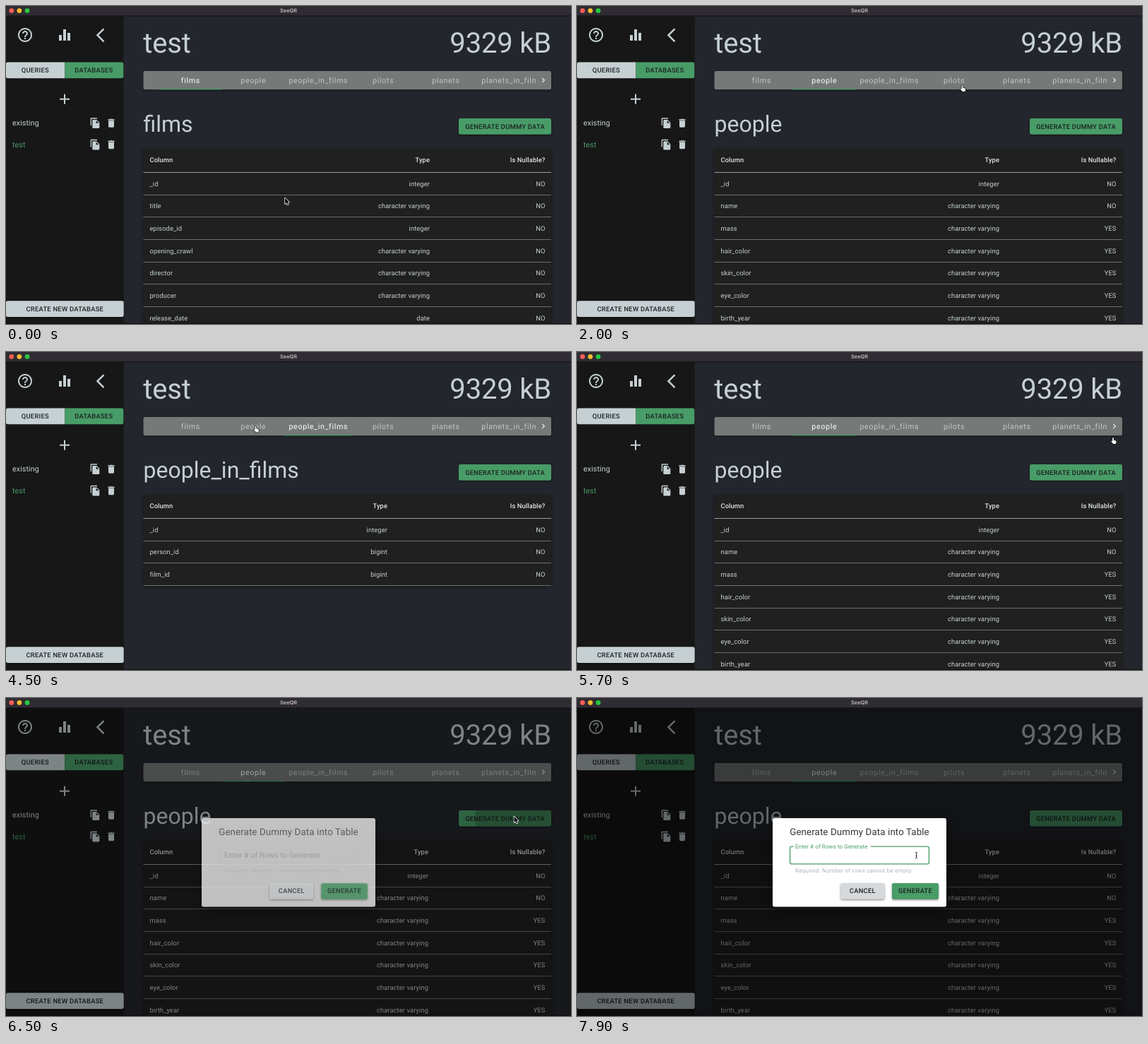
An HTML page with a canvas that plays this animation: 800 px wide and 450 px high, repeating every 8000 ms.

```html
<!DOCTYPE html>
<html lang="en">
<head>
<meta charset="utf-8">
<title>SeeQR</title>
<style>
  html, body { margin: 0; width: 100%; height: 100%; overflow: hidden; background: #23252c; }
  canvas { display: block; width: 800px; height: 450px; }
</style>
</head>
<body>
<canvas id="stage"></canvas>
<script>
const LOOP = 8000, STEP = 100;
const GREEN = '#489c67', LIGHT = '#c6d0d3', INK = '#1d2123';
const canvas = document.getElementById('stage');
const ctx = canvas.getContext('2d');
const dpr = window.devicePixelRatio || 1;
canvas.width = 800 * dpr;
canvas.height = 450 * dpr;

const icons = {
  help: 'M11 18h2v-2h-2v2zm1-16C6.48 2 2 6.48 2 12s4.48 10 10 10 10-4.48 10-10S17.52 2 12 2zm0 18c-4.41 0-8-3.59-8-8s3.59-8 8-8 8 3.59 8 8-3.59 8-8 8zm0-14c-2.21 0-4 1.79-4 4h2c0-1.1.9-2 2-2s2 .9 2 2c0 2-3 1.75-3 5h2c0-2.25 3-2.5 3-5 0-2.21-1.79-4-4-4z',
  bars: 'M10 20h4V4h-4v16zm-6 0h4v-8H4v8zM16 9v11h4V9h-4z',
  back: 'M11.67 3.87L9.9 2.1 0 12l9.9 9.9 1.77-1.77L3.54 12z',
  plus: 'M19 13h-6v6h-2v-6H5v-2h6V5h2v6h6v2z',
  copy: 'M16 1H4c-1.1 0-2 .9-2 2v14h2V3h12V1zm-1 4l6 6v10c0 1.1-.9 2-2 2H7.99C6.89 23 6 22.1 6 21l.01-14c0-1.1.89-2 1.99-2h7zm-1 7h5.5L14 6.5V12z',
  trash: 'M6 19c0 1.1.9 2 2 2h8c1.1 0 2-.9 2-2V7H6v12zM19 4h-3.5l-1-1h-5l-1 1H5v2h14V4z',
  next: 'M8.59 16.59L13.17 12 8.59 7.41 10 6l6 6-6 6z',
  arrow: 'M0 0V8.6L2 6.8 3.3 9.8 4.8 9.2 3.5 6.3H6z',
  hand: 'M-.9 4.6V.6a.9.9 0 0 1 1.8 0V3.3l2.8.7q1 .3.9 1.3L4 8.4H.2L-2.5 5.2q-.3-1 .8-.8z',
  beam: 'M-1.6-4Q0-4 0-3V3Q0 4-1.6 4M1.6-4Q0-4 0-3M0 3Q0 4 1.6 4M-1 .9H1'
};
for (const k in icons) icons[k] = new Path2D(icons[k]);

const tabs = [
  { name: 'films', x: 216.5, w: 89 },
  { name: 'people', x: 305.5, w: 89 },
  { name: 'people_in_films', x: 394.5, w: 95 },
  { name: 'pilots', x: 489.5, w: 88.5 },
  { name: 'planets', x: 578, w: 89 }
];

const V = 'character varying', I = 'integer', B = 'bigint';
const tables = {
  films: { right: 600, rows: [['_id', I], ['title', V], ['episode_id', I], ['opening_crawl', V], ['director', V], ['producer', V], ['release_date', 'date']] },
  people: { right: 598, rows: [['_id', I], ['name', V], ['mass', V, 1], ['hair_color', V, 1], ['skin_color', V, 1], ['eye_color', V, 1], ['birth_year', V, 1]] },
  people_in_films: { right: 540, rows: [['_id', I], ['person_id', B], ['film_id', B]] },
  pilots: { right: 540, rows: [['_id', I], ['person_id', B], ['vessel_id', B]] }
};

// [time, tab index]
const clicks = [[0, 0], [1200, 1], [2300, 3], [3400, 2], [5000, 1]];
const PRESS = 6200, OPEN = 6350, FOCUS = 7450;

// [time, x, y] of the pointer's hot spot
const path = [
  [0, 395, 271.5], [700, 350, 103], [1400, 350, 103], [2000, 545.5, 112.5], [2200, 535, 106],
  [2700, 535, 105], [3000, 488, 99.5], [3300, 441, 104], [3800, 441, 104], [4400, 353.5, 105],
  [5200, 353.5, 105], [5700, 759, 121.5], [6100, 719.5, 167.5], [6700, 719.5, 167.5],
  [7400, 480.5, 222.5], [LOOP, 480.5, 222.5]
];

const clamp = v => Math.max(0, Math.min(1, v));
const ease = v => v * v * (3 - 2 * v);
const phase = (t, start, len) => ease(clamp((t - start) / len));
const mix = (a, b, p) => a + (b - a) * p;

function text(str, x, y, size, color, o = {}) {
  ctx.font = `${o.weight || 400} ${size}px ${o.font || 'Roboto'}, sans-serif`;
  ctx.letterSpacing = (o.space || 0) + 'px';
  ctx.textAlign = o.align || 'left';
  ctx.textRendering = 'geometricPrecision';
  ctx.fillStyle = color;
  ctx.fillText(str, x, y);
}

function rect(x, y, w, h, color) {
  ctx.fillStyle = color;
  ctx.fillRect(x, y, w, h);
}

function box(x, y, w, h, color, r = 2.67, shadow = 0) {
  ctx.save();
  if (shadow) {
    ctx.shadowColor = 'rgba(0,0,0,.45)';
    ctx.shadowBlur = shadow * dpr;
    ctx.shadowOffsetY = shadow * dpr * 0.4;
  }
  ctx.beginPath();
  ctx.roundRect(x, y, w, h, r);
  ctx.fillStyle = color;
  ctx.fill();
  ctx.restore();
}

function icon(name, x, y, scale, color) {
  ctx.save();
  ctx.translate(x, y);
  ctx.scale(scale, scale);
  ctx.fillStyle = color;
  ctx.fill(icons[name], 'evenodd');
  ctx.restore();
}

function label(str, x, y, color = INK) {
  text(str, x, y + 3.3, 9.33, color, { weight: 500, space: 0.267, align: 'center' });
}

function drawTitleBar() {
  rect(0, 0, 800, 14, '#302c33');
  rect(0, 13.5, 800, 1, '#111114');
  ['#fe5f57', '#febc2e', '#28c840'].forEach((c, i) => {
    ctx.beginPath();
    ctx.arc(7.8 + i * 11.1, 6.6, 3.4, 0, 7);
    ctx.fillStyle = c;
    ctx.fill();
  });
  text('SeeQR', 400, 9.4, 7.4, '#bdbabf', { font: 'Inter', weight: 600, align: 'center' });
}

function drawSidebar() {
  rect(0, 14, 166.7, 436, '#171717');
  icon('help', 15, 29, 1, LIGHT);
  icon('bars', 71, 29, 1, LIGHT);
  icon('back', 127.7, 29.3, 1, LIGHT);
  box(0, 79.5, 83.3, 22.7, LIGHT, [2.67, 0, 0, 2.67]);
  box(83.3, 79.5, 83, 22.7, GREEN, [0, 2.67, 2.67, 0]);
  label('QUERIES', 41.3, 90.7);
  label('DATABASES', 124.3, 90.7);
  icon('plus', 71, 119.7, 1, LIGHT);
  [['existing', LIGHT], ['test', GREEN]].forEach(([name, color], i) => {
    const y = 165.7 + i * 30.5;
    text(name, 9, y + 3.6, 10.67, color, { space: 0.1 });
    icon('copy', 118.3, y - 8, 0.667, LIGHT);
    icon('trash', 141, y - 8, 0.667, LIGHT);
  });
  box(0, 417.2, 166.7, 22.7, LIGHT, 2.67, 2);
  label('CREATE NEW DATABASE', 83.3, 428.5);
}

function drawTabs(t, now, before, since) {
  box(194.5, 92, 577.5, 26.3, '#757978', 2.67, 3);
  ctx.save();
  ctx.beginPath();
  ctx.rect(194, 92, 556, 27);
  ctx.clip();
  tabs.forEach((tab, i) => {
    text(tab.name, tab.x + tab.w / 2 + 0.3, 108.8, 10.67, i === now ? '#ffffff' : '#c0c8ca',
      { space: 0.667, align: 'center' });
  });
  text('planets_in_films', 673.3, 108.8, 10.67, '#c0c8ca', { space: 0.667 });
  const p = phase(t, since, 300), a = tabs[before], b = tabs[now];
  rect(mix(a.x, b.x, p), 117, mix(a.w, b.w, p), 1.33, GREEN);
  ctx.restore();
  icon('next', 753.6, 97.8, 0.6, '#eef2f3');
}

function drawTable(name) {
  const { right, rows } = tables[name];
  const top = 235.5, pitch = 31.67;
  const space = 0.1;
  box(194.5, 201.5, 577.5, 34 + rows.length * pitch, '#202020', 2.67, 5);
  const head = { weight: 500, space };
  text('Column', 203.5, 221.3, 9.33, '#dfe5e6', head);
  text('Type', right, 221.3, 9.33, '#dfe5e6', { ...head, align: 'right' });
  text('Is Nullable?', 763.5, 221.3, 9.33, '#dfe5e6', { ...head, align: 'right' });
  rect(194.5, 235, 577.5, 1, '#989d9e');
  rows.forEach(([col, type, nullable], i) => {
    const y = top + (i + 0.5) * pitch + 3.2;
    text(col, 203.5, y, 9.33, LIGHT, { space });
    text(type, right, y, 9.33, LIGHT, { space, align: 'right' });
    text(nullable ? 'YES' : 'NO', 763.5, y, 9.33, LIGHT, { space, align: 'right' });
    rect(194.5, Math.floor(top + (i + 1) * pitch), 577.5, 1, '#6b6e6f');
  });
}

function drawGenerate(t) {
  box(641, 159, 131, 22.7, GREEN, 2.67, 3);
  const p = clamp((t - PRESS) / 500);
  if (p > 0 && p < 1) {
    ctx.save();
    ctx.beginPath();
    ctx.roundRect(641, 159, 131, 22.7, 2.67);
    ctx.clip();
    ctx.beginPath();
    ctx.arc(719, 170, 85 * ease(p), 0, 7);
    ctx.fillStyle = 'rgba(0,0,0,.2)';
    ctx.fill();
    ctx.restore();
  }
  label('GENERATE DUMMY DATA', 706.5, 170.4);
}

function drawField(t) {
  const p = phase(t, FOCUS, 200);
  const on = p > 0;
  ctx.beginPath();
  ctx.roundRect(301.6, 210.2, 196.8, 24.6, 2.67);
  ctx.strokeStyle = on ? GREEN : '#b4b8ba';
  ctx.lineWidth = on ? 1.33 : 0.8;
  ctx.stroke();
  if (on) rect(306.5, 209, 109.5 * p, 2.6, '#fff');
  text('Enter # of Rows to Generate', 309, mix(225.8, 213.4, p), mix(10.67, 8, p),
    on ? GREEN : '#8b8f91', { space: 0.1 });
}

function drawDialog(t) {
  const p = phase(t, OPEN, 225);
  if (!p) return;
  rect(0, 14.5, 800, 435.5, `rgba(0,0,0,${0.5 * p})`);
  ctx.save();
  ctx.globalAlpha = p;
  box(277, 170, 246, 125.5, '#fff', 2.67, 14);
  text('Generate Dummy Data into Table', 400, 193.8, 13.33, '#33373a', { space: 0.1, align: 'center' });
  drawField(t);
  text('Required: Number of rows cannot be empty', 309, 246.8, 8, '#adb3b5', { space: 0.267 });
  box(373.3, 262, 62, 22.7, '#d6d9db', 2.67, 3);
  box(446, 262, 66, 22.7, GREEN, 2.67, 3);
  label('CANCEL', 404.3, 273);
  label('GENERATE', 479, 273);
  ctx.restore();
}

function drawPointer(t) {
  const i = path.findIndex((k, n) => n > 0 && t <= k[0]);
  const a = path[i - 1], b = path[i];
  const p = ease((t - a[0]) / (b[0] - a[0]));
  const kind = t < 500 || (t >= OPEN && t < 7200) ? 'arrow' : t < OPEN ? 'hand' : 'beam';
  ctx.save();
  ctx.translate(mix(a[1], b[1], p), mix(a[2], b[2], p));
  ctx.lineJoin = 'round';
  if (kind === 'beam') {
    ctx.lineWidth = 0.9;
    ctx.strokeStyle = '#222';
    ctx.stroke(icons.beam);
  } else {
    const arrow = kind === 'arrow';
    ctx.lineWidth = 1.5;
    ctx.strokeStyle = arrow ? '#f4f4f4' : '#1a1a1a';
    ctx.fillStyle = arrow ? '#0a0a0a' : '#f4f4f4';
    ctx.stroke(icons[kind]);
    ctx.fill(icons[kind]);
  }
  ctx.restore();
}

function draw(t) {
  ctx.setTransform(dpr, 0, 0, dpr, 0, 0);
  rect(0, 0, 800, 450, '#24262d');
  const n = clicks.filter(c => c[0] <= t).length - 1;
  const [since, now] = clicks[n];
  const before = clicks[Math.max(0, n - 1)][1];
  const name = tabs[now].name;
  text('test', 194.3, 66, 40, LIGHT, { space: -0.2 });
  text('9329 kB', 772, 66, 40, LIGHT, { space: -0.2, align: 'right' });
  drawTabs(t, now, before, since);
  text(name, 194.5, 178.3, 32, LIGHT);
  drawGenerate(t);
  drawTable(name);
  drawSidebar();
  drawTitleBar();
  drawDialog(t);
  rect(0, 449, 800, 1, '#0e0e10');
  drawPointer(t);
}

const start = performance.now();
function tick() {
  const t = (performance.now() - start) % LOOP;
  draw(Math.floor(t / STEP) * STEP);
  requestAnimationFrame(tick);
}
tick();
</script>
</body>
</html>
```
